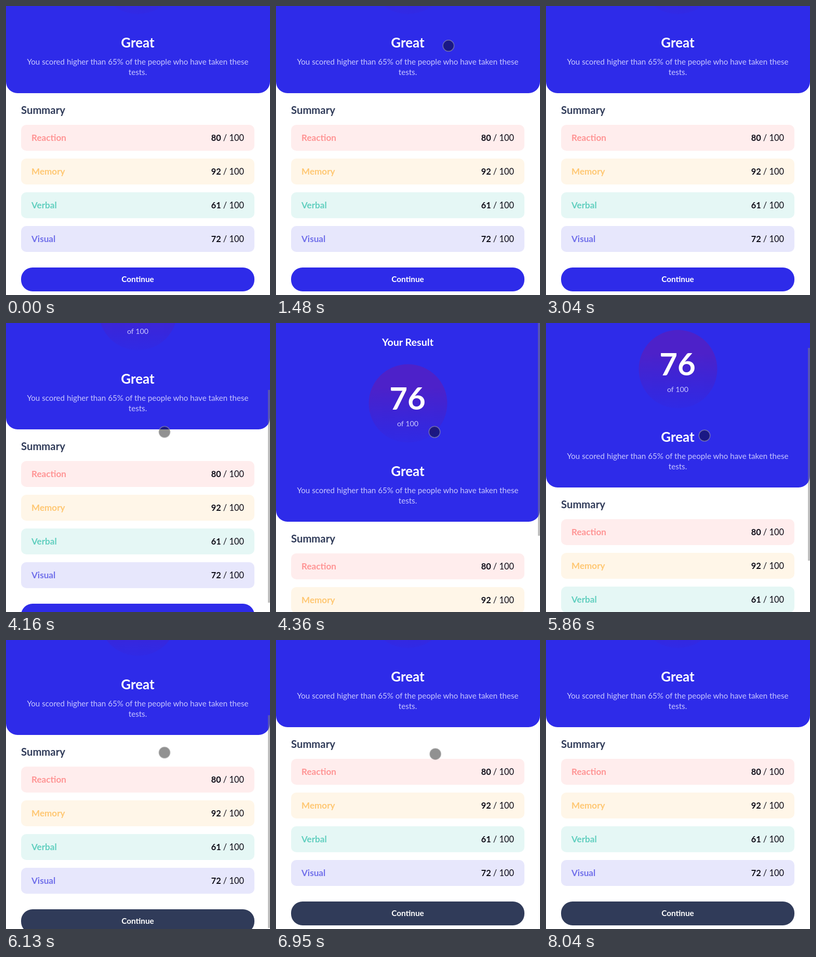
An HTML page for the animation above (8430 ms loop, 508x557 px).

```html
<!DOCTYPE html>
<html lang="en">
<head>
<meta charset="utf-8">
<title>Result summary</title>
<style>
  html, body { margin: 0; width: 100%; height: 100%; overflow: hidden; background: #fff; }
  svg { display: block; font-family: Lato, "Open Sans", sans-serif; }
  .mid { text-anchor: middle; }
  .bold { font-weight: 700; }
  .soft { fill: #c8c7ff; }
  .value { text-anchor: end; font-size: 16.4px; fill: #0c0b16; }
</style>
</head>
<body>
<svg width="508" height="557" viewBox="0 0 508 557">
  <defs>
    <linearGradient id="disc" x2="0" y2="1">
      <stop offset=".3" stop-color="#4d21c9"/>
      <stop offset="1" stop-color="#4021ca" stop-opacity=".12"/>
    </linearGradient>
  </defs>
  <g id="page">
    <rect y="-60" width="508" height="443" rx="22" fill="#2e2be9"/>
    <g class="mid" fill="#fff">
      <text class="bold" x="253.5" y="44" font-size="19.7">Your Result</text>
      <circle cx="254" cy="155" r="75.5" fill="url(#disc)"/>
      <text class="bold" x="253" y="167" font-size="60">76</text>
      <text class="soft" x="253.5" y="199" font-size="14.3">of 100</text>
      <text class="bold" x="253.5" y="295" font-size="25.9">Great</text>
      <g class="soft" font-size="15.15">
        <text x="253.5" y="328">You scored higher than 65% of the people who have taken these</text>
        <text x="253.5" y="348">tests.</text>
      </g>
    </g>
    <text class="bold" x="29" y="423" font-size="20.3" fill="#303b59">Summary</text>
    <g id="rows"></g>
    <rect id="button" x="29" y="719" width="449" height="46" rx="22"/>
    <text class="mid bold" x="253.5" y="747" font-size="15.3" fill="#fff">Continue</text>
  </g>
  <rect id="thumb" x="504" width="4" height="410" fill="#808080"/>
  <circle id="cursor" r="10.75" fill="#000" fill-opacity=".43" stroke="#a8a8a8" stroke-opacity=".55" stroke-width="1.5"/>
</svg>
<script>
const LOOP = 8430, TICK = LOOP / 125, MAX_SCROLL = 215;
const [page, rows, button, thumb, cursor] =
  ["page", "rows", "button", "thumb", "cursor"].map(id => document.getElementById(id));

rows.innerHTML = [
  ["Reaction", 80, "#ff5555"],
  ["Memory", 92, "#ffa51e"],
  ["Verbal", 61, "#00b298"],
  ["Visual", 72, "#1a18dc"],
].map(([name, score, color], i) => `<g transform="translate(29 ${444 + i * 65})" fill="${color}">
  <rect width="449" height="50" rx="10" fill-opacity=".1"/>
  <text class="bold" x="20" y="31" font-size="17.1" fill-opacity=".58">${name}</text>
  <text class="value" x="429" y="31"><tspan class="bold">${score}</tspan> / 100</text></g>`).join("");

const smooth = v => v * v * (3 - 2 * v);
const progress = (t, from, length) => Math.min(1, Math.max(0, (t - from) / length));
const glide = (t, from, length) => smooth(progress(t, from, length));

// Cursor moves: start time, duration, x and y to reach.
const moves = [
  [130, 670, 316, 186],
  [940, 560, 332, 76],
  [1740, 340, 325, 76],
  [2760, 490, 305, 210],
  [4570, 210, 305, 217],
  [6880, 1160, 521, 570],
];

const cursorAt = t => moves.reduce(([x, y], [from, length, toX, toY]) => {
  const k = glide(t, from, length);
  return [x + (toX - x) * k, y + (toY - y) * k];
}, [451, 496]);

const scrollAt = t => MAX_SCROLL * (1 - glide(t, 4102, 275) + glide(t, 5650, 571));

const thumbOpacity = t => t < 5650
  ? 1 - progress(t, 4570, 350)
  : 1 - progress(t, 6600, 350);

function draw(now) {
  const time = now % LOOP;
  // The picture refreshes about 15 times a second.
  const t = (Math.floor(time / TICK + 0.35) - 0.1) * TICK;
  const scrolled = time >= 4160;
  const scroll = scrolled ? Math.round(scrollAt(t)) : MAX_SCROLL;
  page.setAttribute("transform", `translate(0 ${-scroll})`);
  button.setAttribute("fill", time < 4230 ? "#2e2be9" : "#303b59");
  thumb.setAttribute("y", Math.round(scroll * 0.726));
  thumb.setAttribute("fill-opacity", scrolled ? 0.5 * thumbOpacity(t) : 0);
  const visible = scrolled ? time < 8040 : time >= 190 && time < 3040;
  cursor.setAttribute("visibility", visible ? "visible" : "hidden");
  cursor.setAttribute("transform", `translate(${cursorAt(t)})`);
  requestAnimationFrame(draw);
}
requestAnimationFrame(draw);
</script>
</body>
</html>
```
